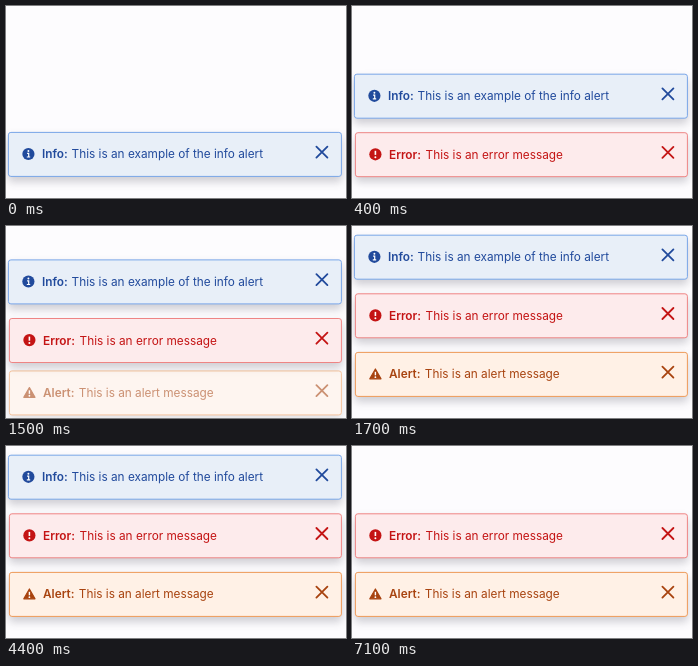
These frames come from a looping animation (340x192 px, 8 s). An HTML page:

```html
<!DOCTYPE html>
<html lang="en">
<head>
<meta charset="utf-8">
<title>Stacked alerts</title>
<style>
  html, body { margin: 0; width: 100%; height: 100%; overflow: hidden; background: #fdfcfe; }
  svg { display: block; }
  #stage { width: 100vw; height: 100vh; }
  text { font: 11.8px Inter, sans-serif; }
  .label { font-weight: 600; }
  .box { filter: drop-shadow(0 5px 4px rgba(40, 40, 60, .22)); }
</style>
</head>
<body>
<svg id="stage" viewBox="0 0 340 192"></svg>
<script>
const LOOP = 8000, DURATION = 400, HEIGHT = 44, STEP = 58.6, BOTTOM = 126.4;

const disc = '<circle cx="0" cy="0" r="6.1" fill="currentColor"/>';
const icons = {
  info: disc + '<path d="M-1.3 -.7H.3V3M-1.6 3H1.8" fill="none" stroke="#fff" stroke-width="1.2"/><circle cy="-3" r=".95" fill="#fff"/>',
  error: disc + '<path d="M0 -3.5V.6" stroke="#fff" stroke-width="1.6"/><circle cy="2.9" r="1" fill="#fff"/>',
  alert: '<path d="M0 -5L5.6 4.8H-5.6Z" fill="currentColor" stroke="currentColor" stroke-width="1.2" stroke-linejoin="round"/>' +
    '<path d="M0 -2.2V1.3" stroke="#fff" stroke-width="1.4"/><circle cy="3.2" r=".9" fill="#fff"/>'
};

// enter: when the alert slides in; leave: when it drops away
const alerts = [
  { kind: 'info', label: 'Info:', message: 'This is an example of the info alert', x: 2.4, textX: 36, messageX: 65.6,
    color: '#214a9c', fill: '#e8eff8', border: '#78a5e8', enter: -1000, leave: 6660 },
  { kind: 'error', label: 'Error:', message: 'This is an error message', x: 3.4, textX: 37, messageX: 73.6,
    color: '#c41414', fill: '#fdebec', border: '#ee8484', enter: 20, leave: Infinity },
  { kind: 'alert', label: 'Alert:', message: 'This is an alert message', x: 3.4, textX: 37, messageX: 72.8,
    color: '#a8430f', fill: '#fff1e6', border: '#ee9a58', enter: 1280, leave: Infinity }
];

const stage = document.getElementById('stage');
stage.innerHTML = alerts.map(a => `
  <g color="${a.color}">
    <rect class="box" x="${a.x}" y="0" width="${335.4 - a.x}" height="${HEIGHT}" rx="2.5" fill="${a.fill}" stroke="${a.border}"/>
    <g transform="translate(${a.x + 20} 21.6)">${icons[a.kind]}</g>
    <text y="26" fill="currentColor"><tspan class="label" x="${a.textX}">${a.label}</tspan><tspan x="${a.messageX}">${a.message}</tspan></text>
    <path d="M310.4 14.2l11 11m0 -11l-11 11" stroke="currentColor" stroke-width="1.8" stroke-linecap="round"/>
  </g>`).join('');
const groups = [...stage.children];

function progress(t, start) {
  const p = Math.min(1, Math.max(0, (t - start) / DURATION));
  return p * p * (3 - 2 * p);
}

function draw(now) {
  const t = now % LOOP;
  alerts.forEach((a, i) => {
    const shown = progress(t, a.enter) * (1 - progress(t, a.leave));
    const pushed = alerts.slice(i + 1).reduce((sum, b) => sum + progress(t, b.enter), 0);
    const y = BOTTOM - STEP * pushed + HEIGHT * (1 - shown);
    groups[i].setAttribute('transform', `translate(0 ${y.toFixed(2)})`);
    groups[i].setAttribute('opacity', shown.toFixed(3));
  });
  requestAnimationFrame(draw);
}
draw(performance.now());
</script>
</body>
</html>
```
